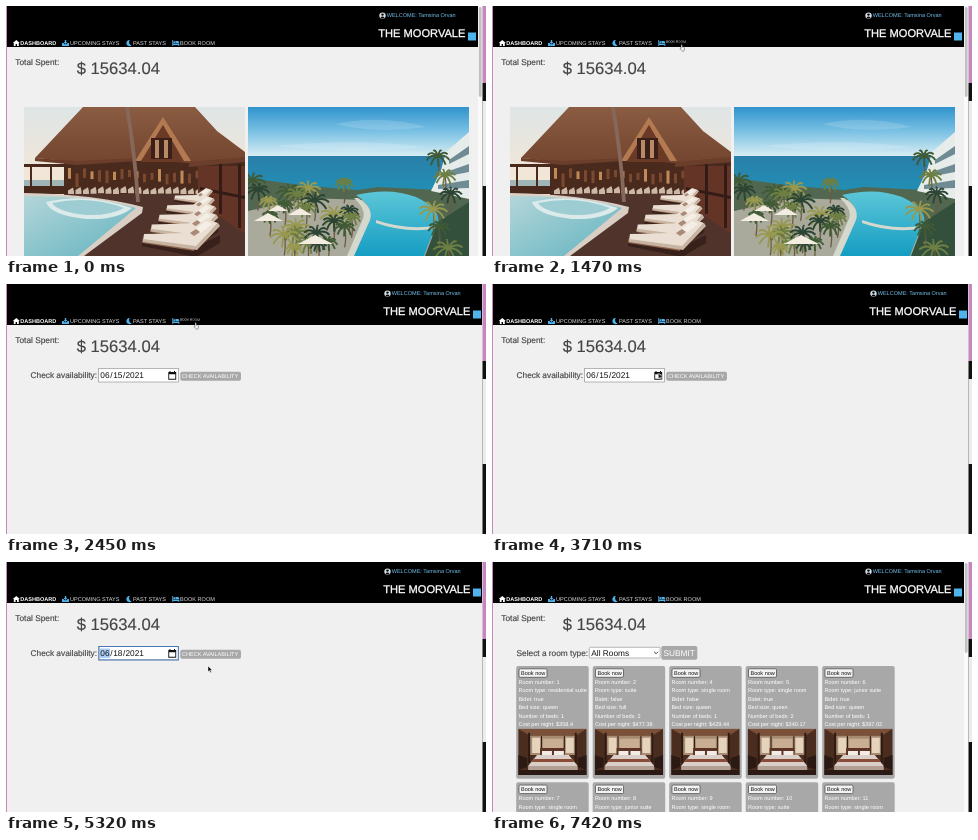
Animation of 480x250 px, one loop 7.49 s. Source, as an HTML page:

```html
<!DOCTYPE html>
<html lang="en">
<head>
<meta charset="utf-8">
<title>Hotel booking</title>
<style>
html, body { margin: 0; width: 100%; height: 100%; overflow: hidden; background: #f0f0f0; }
#stage { display: block; width: 100vw; height: 100vh; font: 5.55px "Liberation Sans", Arial, sans-serif; text-rendering: geometricPrecision; }
.mid { font-size: 8.32px; }
.ink { fill: #444; stroke: #444; stroke-width: .15; }
.white { fill: #fff; }
.title { font-size: 11.1px; stroke: #fff; stroke-width: .3; }
.blue { fill: #50b4ec; }
.grey { fill: #a8a8a8; }

/* One loop is 7490 ms; 1% is 74.9 ms. */
.loop { animation: 7490ms step-end infinite; }
#dashboard { animation-name: dashboard; }
#booking { animation-name: booking; }
#rooms { animation-name: rooms; }
#account { animation-name: account; }
.scrollbar { animation-name: scrollbar; }
#picker { animation-name: picker; }
.focus { animation-name: focus; }
.before { animation-name: before; }
.after { animation-name: after; }
.hand { animation-name: hand; }
.arrow { animation-name: arrow; }
#link { transform-origin: 174px 33.5px; animation-name: link; animation-timing-function: linear; }
#cursor { animation-name: cursor; animation-timing-function: ease-in-out; }

@keyframes dashboard { 0% { opacity: 1 } 28.97%, 100% { opacity: 0 } }
@keyframes booking { 0% { opacity: 0 } 28.97% { opacity: 1 } 78.5%, 100% { opacity: 0 } }
@keyframes rooms { 0% { opacity: 0 } 78.5%, 100% { opacity: 1 } }
@keyframes account { 0% { transform: none } 28.97% { transform: translateX(5px) } 78.5%, 100% { transform: none } }
@keyframes scrollbar { 0% { opacity: 1 } 28.97% { opacity: 0 } 78.5%, 100% { opacity: 1 } }
@keyframes picker { 0% { opacity: 0 } 51.4% { opacity: 1 } 68.22%, 100% { opacity: 0 } }
@keyframes focus { 0% { opacity: 0 } 51.4%, 100% { opacity: 1 } }
@keyframes before { 0% { opacity: 1 } 68.22%, 100% { opacity: 0 } }
@keyframes after { 0% { opacity: 0 } 68.22%, 100% { opacity: 1 } }
@keyframes hand { 0% { opacity: 0 } 8.41% { opacity: 1 } 39.2% { opacity: 0 } 73% { opacity: 1 } 78.5%, 100% { opacity: 0 } }
@keyframes arrow { 0% { opacity: 1 } 8.41% { opacity: 0 } 39.2% { opacity: 1 } 73% { opacity: 0 } 78.5%, 100% { opacity: 1 } }
@keyframes link {
  0%, 8.41% { transform: none }
  10.3%, 39.2% { transform: scale(.57) }
  41%, 100% { transform: none }
}
@keyframes cursor {
  0%, .93% { transform: translate(240px, 262px) }
  7.48% { transform: translate(185px, 34px) }
  10.28%, 38.3% { transform: translate(189px, 38.5px) }
  47.7%, 57.9% { transform: translate(166.5px, 89px) }
  67.3%, 68.22% { transform: translate(156px, 147px) }
  71.03% { transform: translate(202px, 104px) }
  75.7%, 78.5% { transform: translate(205px, 92px) }
  88%, 100% { transform: translate(225px, 262px) }
}
</style>
</head>
<body>
<svg id="stage" viewBox="0 0 480 250" preserveAspectRatio="none">
  <defs>
    <linearGradient id="dusk" x2="0" y2="1">
      <stop stop-color="#dfe5e6"/><stop offset=".5" stop-color="#f3e6d6"/>
    </linearGradient>
    <linearGradient id="sky" x2="0" y2="1">
      <stop stop-color="#2f93cd"/><stop offset=".5" stop-color="#7cc2e4"/><stop offset="1" stop-color="#dceff4"/>
    </linearGradient>
    <linearGradient id="sea" x2="0" y2="1">
      <stop stop-color="#2a7fa9"/><stop offset="1" stop-color="#1f93b8"/>
    </linearGradient>
    <linearGradient id="pool" x2="1" y2="1">
      <stop stop-color="#b4d6d9"/><stop offset="1" stop-color="#62b3c0"/>
    </linearGradient>
    <linearGradient id="lagoon" x2="0" y2="1">
      <stop stop-color="#5cc6d8"/><stop offset="1" stop-color="#159dc2"/>
    </linearGradient>
    <linearGradient id="roof" x2="0" y2="1">
      <stop stop-color="#8a5c42"/><stop offset="1" stop-color="#74452f"/>
    </linearGradient>
    <path id="bed" d="M0 0h.9v3.500H7V6h-.9V5H.9v1H0zM1.300 1.200h1.500v1.800H1.300zM3.200 1h2.300Q7 1 7 3H3.200z"/>
    <symbol id="bedroom" viewBox="0 0 69 46" preserveAspectRatio="none">
      <path fill="#4a2d1f" d="M0 0h69v46H0z"/>
      <path fill="#7a5138" d="M0 0h69L58 7H12z"/>
      <path fill="#a78a72" d="M12 7h46v19H12z"/>
      <path fill="#e5d3bb" d="M14 9h8v15h-8zM48 9h8v15h-8z"/>
      <path fill="#c9ae93" d="M25 10h20v10H25z"/>
      <path fill="#2c1a13" d="M10 4h2v30h-2zM57 4h2v30h-2zM23 7h1v17h-1zM46 7h1v17h-1z"/>
      <path fill="#5c3425" d="M22 19h25v7H22z"/>
      <path fill="#f2ece6" d="M24 22h10v4H24zM36 22h10v4H36z"/>
      <path fill="#d9cfc8" d="M19 26h32l9 11H10z"/>
      <path fill="#b29f94" d="M10 37h50v4H10z"/>
      <path fill="#8b4c37" d="M16 30h38l3 3H13z"/>
      <path fill="#2b1913" d="M0 41h69v5H0zM0 26l9 3v9l-9 3zM69 26l-9 3v9l9 3z"/>
    </symbol>
  </defs>

  <path fill="#f0f0f0" d="M0 0h480v250H0z"/>

  <g id="dashboard" class="loop">
    <svg x="18" y="101" width="221" height="149" viewBox="18 101 221 149">
      <path fill="url(#dusk)" d="M18 101h221v149H18z"/>
      <path fill="#9fb5b8" d="M18 174h40v12H18z"/>
      <path fill="#4b2a1e" d="M58 150h181v50H58zM18 158h50v3H18zM24 160h2v26h-2zM44 160h2v26h-2zM18 180h45v8H18z"/>
      <path fill="url(#roof)" d="M77 101h112l22 24 28 21v6l-56 5-52-4-60 3-42-4z"/>
      <path fill="#6a3e2a" d="M29 152l42 3 60-3v3l-60 4-42-4zM183 156l56-5v5l-56 5z"/>
      <path fill="#b37a52" d="M157 111l-28 44h6l22-36 21 36h7z"/>
      <path fill="#6b3a27" d="M157 119l-22 37h43z"/>
      <path fill="#3a2019" d="M145 132h21v21h-21z"/>
      <path fill="#b98a66" d="M149 134h4v18h-4zM158 134h4v18h-4z"/>
      <g id="terrace"></g>
      <path fill="#50332a" d="M60 188h179v62H70z"/>
      <path fill="#643526" d="M192 160h47v68l-47-32z"/>
      <path fill="#331c16" d="M194 181l45 9v3l-45-9zM213 158h3v50h-3zM232 158h3v64h-3z"/>
      <path fill="#d9cfc4" d="M18 187q70 1 119 14l-1 6-58 43H18z"/>
      <path fill="url(#pool)" d="M18 190q72 0 112 12l-58 48H18z"/>
      <path fill="#dcebea" d="M40 196q40-10 86 6-14 12-46 11-36-4-40-17z"/>
      <path fill="#9dcdd3" d="M46 197q38-8 72 5-14 8-38 7-28-3-34-12z"/>
      <path fill="none" stroke="#86685a" stroke-width="3.800" d="M121 101q8 48 11 95"/>
      <g id="loungers"></g>
    </svg>
    <svg x="242" y="101" width="221" height="149" viewBox="242 101 221 149">
      <path fill="url(#sky)" d="M242 101h221v50H242z"/>
      <path fill="#fff" opacity=".15" d="M330 118q45-10 90 3-50 7-90-3zM270 140q80-8 150 1-80 7-150-1z"/>
      <path fill="url(#sea)" d="M242 150h221v45H242z"/>
      <path fill="#51674f" d="M242 172l60 8 50 4 20-3 60 3 31-5v71H242z"/>
      <path fill="#a9aa9b" d="M242 205l60-13 56 2 85 30 10 26H242z"/>
      <path fill="url(#lagoon)" d="M350 189q34-8 60 2 26 12 22 28-6 8-14 31h-72l14-36q12-10-10-25z"/>
      <path fill="#d5d9cd" d="M352 192q16 10 12 22l-16 36h-7l15-35q6-10-8-23zM370 214q28 10 60 6l-2 3q-30 4-58-6z"/>
      <path fill="#33503d" d="M432 216l31-20v54h-44z"/>
      <path fill="#e6ecea" d="M463 126l-23 20-5 18-10 21 38 8z"/>
      <path fill="#6f8c94" d="M463 140l-20 14v4l20-10zM463 158l-26 9v4l26-5zM463 174l-31 5v4l31-1z"/>
      <g id="palms"></g>
      <path fill="#f3ede1" d="M248 215l14-8 15 8zM282 209l12-7 12 7zM292 238l17-9 18 9zM262 205l10-6 10 6z"/>
    </svg>
  </g>

  <g id="booking" class="loop">
    <text class="mid ink" x="24.500" y="94">Check availability:</text>
    <rect x="92.700" y="84.300" width="79.600" height="13.700" fill="#fff" stroke="#858585" stroke-width=".6"/>
    <g class="loop focus">
      <rect x="93" y="84.500" width="79.300" height="13.400" fill="none" stroke="#4a79b8" stroke-width="1"/>
      <path fill="#a9cdf7" d="M94 86.500h10v9.500H94z"/>
    </g>
    <g class="mid" fill="#111">
      <text x="94.300" y="94">06</text><text x="104.300" y="94">/</text>
      <text class="loop before" x="107.200" y="94">15</text>
      <text class="loop after" x="107.200" y="94">18</text>
      <text x="117" y="94">/</text><text x="119.500" y="94">2021</text>
    </g>
    <path fill="#111" fill-rule="evenodd" d="M162.300 88h1.200v-1h1v1h3.500v-1h1v1h1.200v7.700h-7.900zM163.200 90.200v4.600h6.100v-4.600z"/>
    <rect class="grey" x="174.300" y="87.800" width="60.700" height="9" rx="1.800"/>
    <text class="white" x="176" y="94.300">CHECK AVAILABILITY</text>
    <g id="picker" class="loop" font-size="4.500" text-anchor="middle" fill="#222">
      <rect x="93" y="99" width="81.500" height="99" rx="1" fill="#fff" stroke="#bbb" stroke-width=".6"/>
      <text x="97" y="109" text-anchor="start" font-weight="bold">June 2021</text>
      <path d="M120 106h3l-1.500 2z"/>
      <path fill="none" stroke="#333" stroke-width=".6" d="M155 109v-4.500m-1.700 1.700l1.700-1.700 1.700 1.700M167 104.500v4.500m-1.700-1.700l1.700 1.700 1.700-1.700"/>
      <text x="97" y="193" text-anchor="start" fill="#0b70e0">Today</text>
      <g id="days"></g>
    </g>
  </g>

  <g id="rooms" class="loop">
    <text class="mid ink" x="24.500" y="93.700">Select a room type:</text>
    <rect x="97.300" y="85.300" width="70.800" height="10.700" rx="1" fill="#fff" stroke="#8a8a8a" stroke-width=".6"/>
    <text class="mid" x="99.300" y="93.600" fill="#111">All Rooms</text>
    <path fill="none" stroke="#222" stroke-width=".9" d="M162.200 89.800l1.900 1.900 1.900-1.900"/>
    <rect class="grey" x="169.300" y="84" width="36" height="13.700" rx="1.800"/>
    <text class="mid white" x="171.500" y="93.800">SUBMIT</text>
    <g id="cards"></g>
  </g>

  <path d="M1 0h475v41H1z"/>
  <g class="loop scrollbar">
    <path fill="#fafafa" d="M472 0h4.500v250H472z"/>
    <rect x="472.800" y="1" width="2.800" height="90" rx="1.400" fill="#c1c1c1"/>
  </g>
  <path fill="#c687bd" d="M0 0h1v250H0zM476.500 0h3.500v77h-3.500z"/>
  <path fill="#111" d="M476.500 77h3.500v173h-3.500z"/>
  <path fill="#ececec" d="M476.500 95h3.500v85h-3.500z"/>

  <g id="account" class="loop">
    <circle cx="376.500" cy="9.600" r="3.200" fill="#d5dde2"/>
    <path d="M374.500 11.700q2-2.200 4 0-2 1.600-4 0z"/><circle cx="376.500" cy="8.600" r="1.200"/>
    <text x="380.700" y="11.400" fill="#74c2ee">WELCOME: Tamsina Orvan</text>
    <text class="white title" x="372.300" y="31.300">THE MOORVALE</text>
    <path class="blue" d="M462 26.500h8v8h-8z"/>
  </g>
  <path class="white" d="M10.300 34l3.500 3.100h-1v3h-1.800v-2h-1.400v2H7.800v-3h-1z"/>
  <text class="white" x="14.300" y="39.300" font-weight="bold">DASHBOARD</text>
  <g class="blue">
    <path d="M56 37h1.500l1 1.200h2l1-1.200H63v3h-7zM58.800 34h1.400v2h1.200l-1.900 2-1.900-2h1.200z"/>
    <path d="M123.800 34a3.100 3.100 0 1 0 1.900 5.200 3.200 3.200 0 0 1-1.900-5.200z"/>
    <use href="#bed" x="166.300" y="34"/>
  </g>
  <g fill="#dcdcdc">
    <text x="64" y="39.300">UPCOMING STAYS</text>
    <text x="127" y="39.300">PAST STAYS</text>
    <text id="link" class="loop" x="174" y="39.300">BOOK ROOM</text>
  </g>
  <text class="mid ink" x="9.300" y="59.200">Total Spent:</text>
  <text class="ink" x="70.700" y="68" font-size="16.640">$ 15634.04</text>

  <g id="cursor" class="loop" stroke-width=".5" stroke-linejoin="round">
    <path class="loop arrow" stroke="#fff" d="M0 0v5.800l1.400-1.200 1 2.200 1-.5-1-2.100h1.900z"/>
    <path class="loop hand" fill="#fff" stroke="#333" d="M0 .5q.6-.8 1.200 0v2l2 .6q.6.300.4 1.200l-.6 2H.9L-1 4.200q0-.9 1-.1z"/>
  </g>
</svg>
<script>
const fill = (id, count, draw) => {
  document.getElementById(id).innerHTML = Array.from({ length: count }, (_, i) => draw(i)).join('');
};

// Seeded noise in 0..1
const noise = n => { const v = Math.sin(n * 12.9898) * 43758.5453; return v - Math.floor(v); };

const types = ['residential suite', 'suite', 'single room', 'single room', 'junior suite',
  'single room', 'junior suite', 'single room', 'suite', 'single room'];
const numbers = [1, 2, 4, 5, 6, 7, 8, 9, 10, 11];
const costs = [358.4, 477.38, 429.44, 340.17, 397.02];

fill('cards', 10, i => {
  const col = i % 5;
  const lines = [
    `Room number: ${numbers[i]}`,
    `Room type: ${types[i]}`,
    `Bidet: ${col === 1 || col === 2 ? 'false' : 'true'}`,
    `Bed size: ${col === 1 ? 'full' : 'queen'}`,
    `Number of beds: ${col % 2 + 1}`,
    `Cost per night: $${costs[col]}`
  ].map((line, n) => `<text class="white" x="2.200" y="${18 + n * 8.38}">${line}</text>`).join('');
  return `<g transform="translate(${24.2 + col * 76.5} ${104 + Math.floor(i / 5) * 116.3})">
    <rect class="grey" width="72.500" height="112.700" rx="2"/>
    <rect x="2.800" y="2.800" width="28" height="8.500" rx="1.200" fill="#f3f3f3" stroke="#444" stroke-width=".7"/>
    <text x="4.800" y="8.900" fill="#111">Book now</text>${lines}
    <use href="#bedroom" x="2" y="62.800" width="68.500" height="46.300"/></g>`;
});

// Weekday initials, then six weeks starting on 30 May
fill('days', 49, i => {
  const x = 99.5 + i % 7 * 11.3, y = 119 + Math.floor(i / 7) * 10;
  if (i < 7) return `<text x="${x}" y="${y + 1.5}" fill="#777">${'SMTWTFS'[i]}</text>`;
  const june = i - 8, inMonth = june > 0 && june < 31;
  const day = june < 1 ? june + 31 : inMonth ? june : june - 30;
  const mark = june === 15 ? `<rect x="${x - 5}" y="${y - 4.5}" width="10" height="9" rx="1" fill="#0b70e0"/>` : '';
  const color = mark ? '#fff' : inMonth ? '#222' : '#aaa';
  return `${mark}<text x="${x}" y="${y + 1.5}" fill="${color}">${day}</text>`;
});

// Lit windows and posts above a row of distant chairs
fill('terrace', 18, i => {
  const x = 62 + i * 7.5;
  return `<path fill="${i % 3 ? '#7a4930' : '#c08a58'}" d="M${x} ${162 + noise(i) * 6}h3v${6 + noise(i + 40) * 8}h-3z"/>
    <path fill="#cbb8a6" d="M${x} ${183 + noise(i + 20) * 2}l5-3 1 4v3h-6z"/>`;
});

// Sun beds grow towards the viewer
fill('loungers', 5, i => {
  const x = 168 - i * 8, y = 189 + i * 9.5, s = .5 + i * .125;
  return `<g transform="translate(${x} ${y}) scale(${s})">
    <path fill="#38211a" d="M0 6l52 9 26-13v8l-24 14L0 13z"/>
    <path fill="#8a6149" d="M0 6l52 8v4L0 10z"/>
    <path fill="#eadfd2" d="M2 1l42-1 20-14 12 4-22 24L1 7z"/>
    <path fill="#c8b4a2" d="M1 6l53 7 22-23 2 3-23 24L1 9z"/>
    <path fill="#f5eee6" d="M52-3l12-9 6 3-11 9z"/>
    <path fill="#a98a78" d="M48 0l6-4 4 3-6 4z"/></g>`;
});

fill('palms', 30, i => {
  const right = i > 23;
  const x = right ? 427 + noise(i) * 36 : 246 + noise(i) * 100;
  const y = right ? 150 + (i - 24) * 17 + noise(i + 60) * 8 : 174 + i * 2.9 + noise(i + 60) * 6;
  const r = 8 + noise(i + 90) * 7;
  const green = ['#3f5a35', '#6d7f42', '#2b4433', '#98994f'][i % 4];
  let fronds = '';
  for (let k = 0; k < 9; k++) {
    const a = k * 2 * Math.PI / 9 + noise(i);
    const dx = Math.cos(a) * r, dy = Math.sin(a) * r * .7;
    fronds += `M${x} ${y}q${dx * .6} ${dy * .6 - 4} ${dx} ${dy + 2}`;
  }
  return `<path fill="none" stroke="#6d5a45" stroke-width="1.300" d="M${x} ${y}q2 9 0 20"/>
    <path fill="none" stroke="${green}" stroke-width="1.900" d="${fronds}"/>`;
});
</script>
</body>
</html>
```
